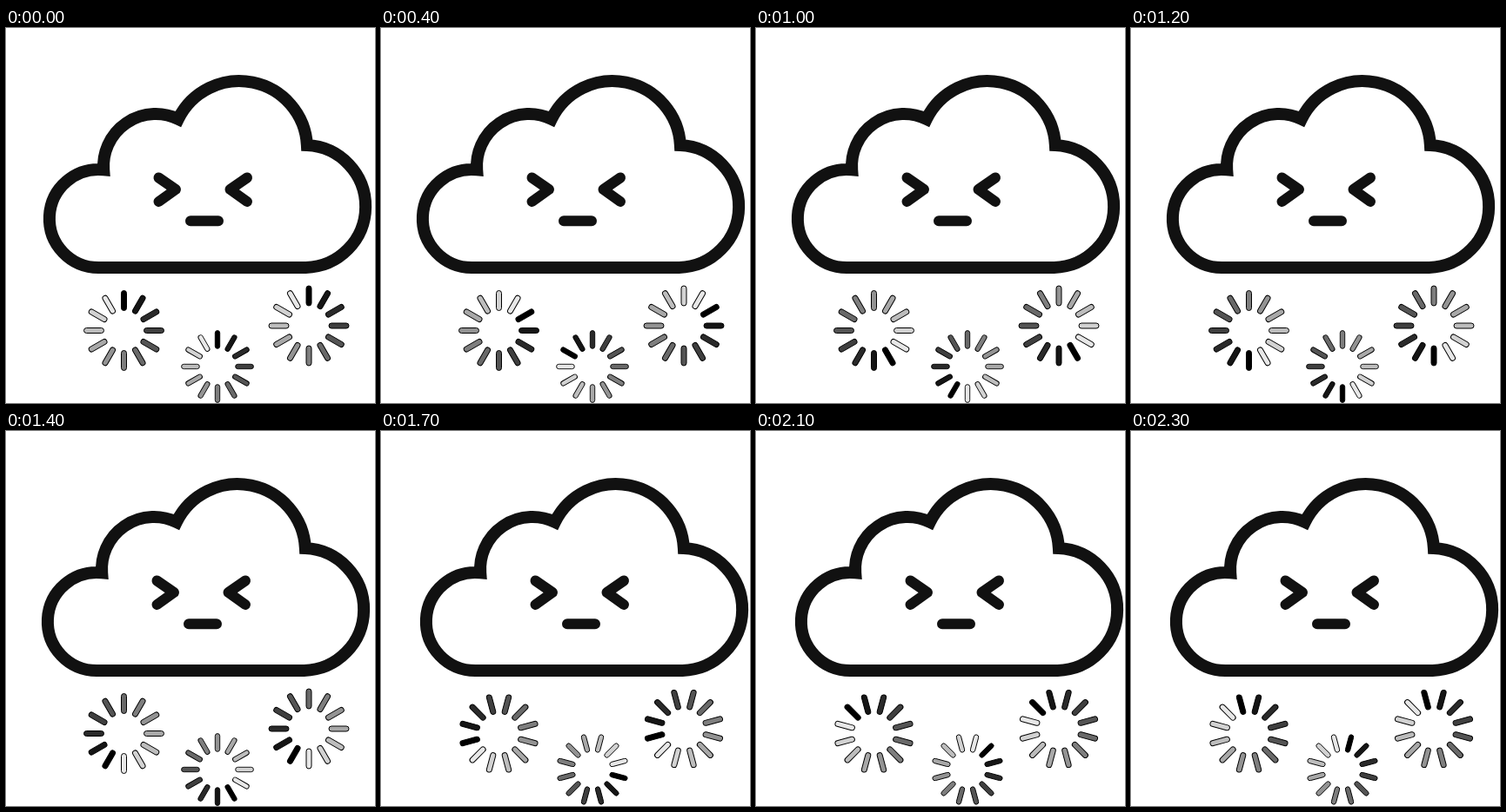
Animation of 424 by 432 pixels, one loop 2400 ms. Source, as an HTML page:

```html
<!DOCTYPE html>
<html lang="en">
<head>
<meta charset="utf-8">
<title>Stormy loading cloud</title>
<style>
  html, body { margin: 0; width: 100%; height: 100%; overflow: hidden; background: #fff; }
  svg { display: block; width: 424px; height: 432px; }
</style>
</head>
<body>
<svg viewBox="0 0 424 432">
  <g id="cloud" fill="none" stroke="#111" stroke-linecap="round">
    <path fill="#fff" stroke-width="14" d="M106.5 276
      A56.5 56.5 0 1 1 112.2 163.3
      A60 60 0 0 1 197.9 104.9
      A78 78 0 0 1 345.9 135.1
      A70.5 70.5 0 0 1 344.5 276Z"/>
    <path stroke-width="12" stroke-linejoin="round"
      d="M175.5 172.5L195 186L175.5 200M277 172.5L257.5 186L277 200M212 222.3H244"/>
  </g>
</svg>
<script>
const STEP = 100, STEPS = 24, SPOKES = 12;
const svg = document.querySelector('svg');
const cloud = document.getElementById('cloud');

function add(parent, tag, attrs) {
  const el = document.createElementNS('http://www.w3.org/2000/svg', tag);
  for (const key in attrs) el.setAttribute(key, attrs[key]);
  return parent.appendChild(el);
}

function makeSpinner(x, y, scale, dir) {
  const el = add(svg, 'g', { stroke: '#000' });
  for (let i = 0; i < SPOKES; i++) {
    const shade = i * 21;
    add(el, 'rect', {
      x: -3, y: -46, width: 6, height: 23, rx: 3,
      fill: `rgb(${shade},${shade},${shade})`,
      transform: `rotate(${i * 360 / SPOKES})`
    });
  }
  return { el, x, y, scale, dir };
}

const spinners = [
  makeSpinner(135.5, 348.5, 1, 1),
  makeSpinner(243, 390, 0.9, -1),
  makeSpinner(348, 343, 1, 1)
];

function draw() {
  const step = Math.floor(performance.now() / STEP) % STEPS;
  // The cloud rests for one step, then shivers from side to side.
  const shift = step === 0 ? 0 : step % 2 ? 2 : -2;
  cloud.setAttribute('transform', `translate(${shift})`);
  for (const { el, x, y, scale, dir } of spinners) {
    const angle = dir * step * 360 / STEPS;
    el.setAttribute('transform', `translate(${x} ${y}) scale(${scale}) rotate(${angle})`);
  }
  requestAnimationFrame(draw);
}
draw();
</script>
</body>
</html>
```
